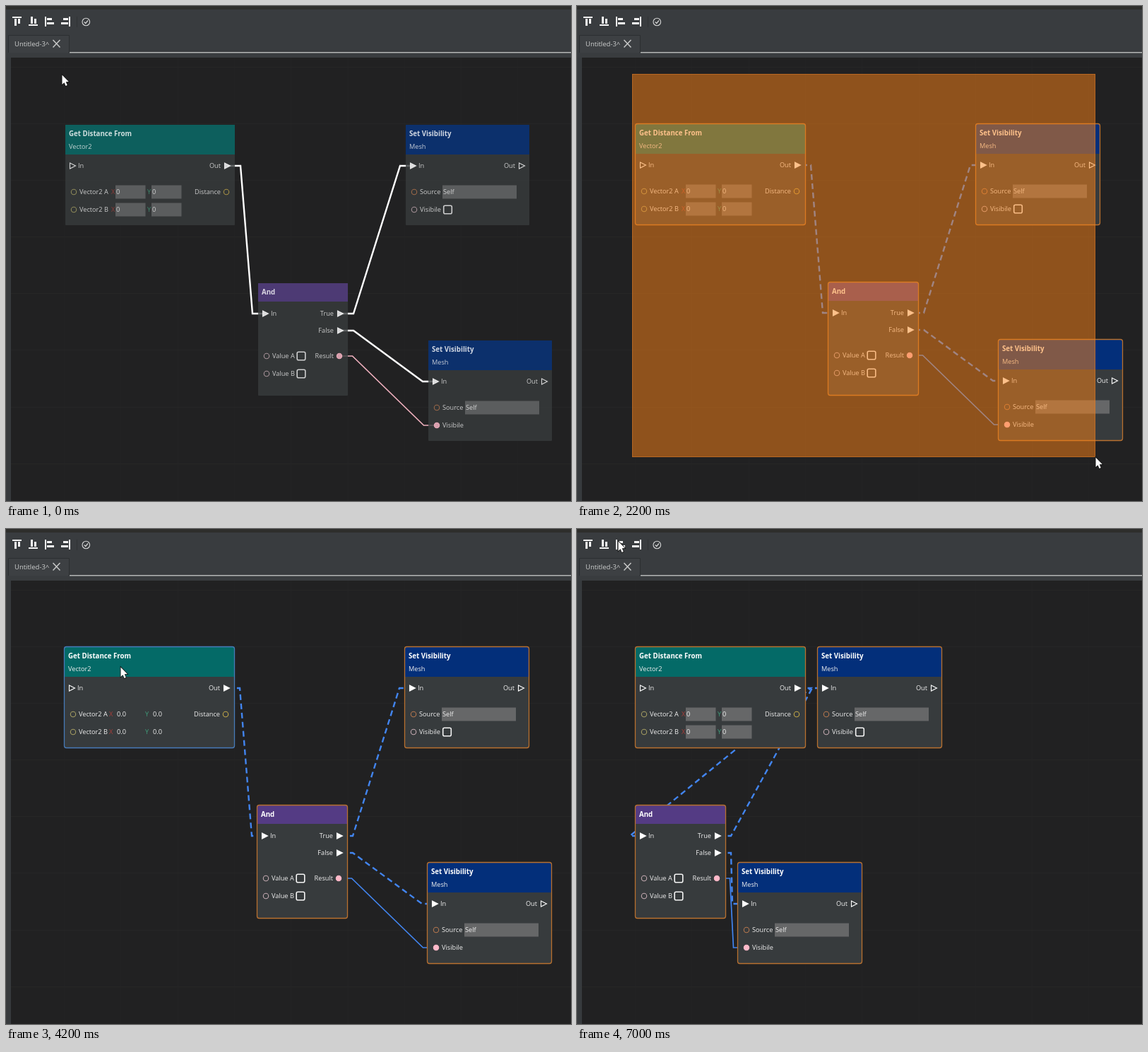
Animation of 800x700 px, one loop 7.2 s. Source, as an HTML page with a canvas:

```html
<!DOCTYPE html>
<html lang="en">
<head>
<meta charset="utf-8">
<title>Node alignment</title>
<style>
  html, body { margin: 0; width: 100%; height: 100%; overflow: hidden; background: #212122; }
  canvas { display: block; }
</style>
</head>
<body>
<canvas id="stage" width="800" height="700"></canvas>
<script>
const ctx = document.getElementById('stage').getContext('2d');
const LOOP = 7200, STEP = 200;
const DRAG_START = 600, DRAG_END = 3800, ALIGN_AT = 6200;
const ORIGIN = [78, 96];
const ORANGE = '#b8702f', BLUE = '#4285f0', PINK = '#ffb9c9';

// Pointer path: time, x, y
const PATH = [
  [0, 79, 97], [600, 79, 97], [1400, 490, 518], [2000, 734, 638], [2200, 734, 638],
  [3200, 758, 647], [3600, 758, 647], [4200, 162, 195], [4800, 60, 22], [5000, 58, 17], [7200, 58, 17]
];

// Pins: kind, side, row offset, label, colour, connected
const meshPins = visible => [
  ['flow', 'in', 58, 'In', '#fff', true],
  ['flow', 'out', 58, 'Out', '#fff', false],
  ['data', 'in', 95, 'Source', '#b5764e', false],
  ['data', 'in', 120, 'Visibile', visible ? PINK : '#c3a9b0', visible]
];
const mesh = (x, alignedX, y, visible) => ({
  x, alignedX, y, w: 175, h: 142, head: 42, color: '#032f7a', title: 'Set Visibility', sub: 'Mesh',
  pins: meshPins(visible),
  extras(n) {
    field(n.x + 52, n.y + 95, 105, 'Self');
    if (!visible) checkbox(n.x + 59.5, n.y + 120);
  }
});
const distance = {
  x: 83, alignedX: 83, y: 167, w: 240, h: 142, head: 42, color: '#046a67',
  title: 'Get Distance From', sub: 'Vector2',
  pins: [
    ['flow', 'in', 58, 'In', '#fff', false],
    ['flow', 'out', 58, 'Out', '#fff', true],
    ['data', 'in', 95, 'Vector2 A', '#a49d62', false],
    ['data', 'in', 120, 'Vector2 B', '#a49d62', false],
    ['data', 'out', 95, 'Distance', '#bfa548', false]
  ],
  extras(n, hover) {
    for (const row of [95, 120]) {
      vectorPart('X', '#a83e3a', n.x + 65, n.y + row, hover);
      vectorPart('Y', '#3f9a78', n.x + 116, n.y + row, hover);
    }
  }
};
const and = {
  x: 356, alignedX: 83, y: 391, w: 127, h: 159, head: 26, color: '#543b84', title: 'And',
  pins: [
    ['flow', 'in', 43, 'In', '#fff', true],
    ['flow', 'out', 43, 'True', '#fff', true],
    ['flow', 'out', 67, 'False', '#fff', true],
    ['data', 'in', 103, 'Value A', '#c3a9b0', false],
    ['data', 'in', 128, 'Value B', '#c3a9b0', false],
    ['data', 'out', 103, 'Result', PINK, true]
  ],
  extras(n) {
    checkbox(n.x + 61, n.y + 103);
    checkbox(n.x + 61, n.y + 128);
  }
};
const upper = mesh(565, 341, 167, false);
const lower = mesh(597, 228, 472, true);
const nodes = [distance, and, upper, lower];
// Wires: from, row, to, row, is data
const wires = [
  [distance, 58, and, 43], [and, 43, upper, 58], [and, 67, lower, 58], [and, 103, lower, 120, true]
];

function rect(x, y, w, h, color) {
  ctx.fillStyle = color;
  ctx.fillRect(x, y, w, h);
}
function line(points, color, width, close) {
  ctx.beginPath();
  points.forEach(([x, y]) => ctx.lineTo(x, y));
  if (close) ctx.closePath();
  ctx.strokeStyle = color;
  ctx.lineWidth = width;
  ctx.stroke();
}
function text(str, x, y, color = '#f0f0f0', align = 'left', font = '9.2px') {
  ctx.font = `${font} "Open Sans", "Noto Sans", sans-serif`;
  ctx.textAlign = align;
  ctx.fillStyle = color;
  ctx.fillText(str, x, y + 3.3);
}
function field(x, y, w, value) {
  rect(x, y - 9.5, w, 19, '#666768');
  text(value, x + 1, y);
}
function vectorPart(axis, color, x, y, hover) {
  if (hover) {
    text(axis, x - 2, y, color);
    text('0.0', x + 9, y);
  } else {
    text(axis, x, y, color);
    field(x + 6, y, 42.5, '0');
  }
}
function checkbox(x, y) {
  ctx.beginPath();
  ctx.roundRect(x - 5.8, y - 5.8, 11.6, 11.6, 2);
  ctx.strokeStyle = '#f4f4f4';
  ctx.lineWidth = 1.6;
  ctx.stroke();
}

function pointer(t) {
  const i = PATH.findIndex(p => p[0] > t);
  const [t0, x0, y0] = PATH[i - 1], [t1, x1, y1] = PATH[i];
  const k = (t - t0) / (t1 - t0);
  return [x0 + (x1 - x0) * k, y0 + (y1 - y0) * k];
}

function drawPin(n, [kind, side, row, label, color, connected]) {
  const out = side === 'out', y = n.y + row, flow = kind === 'flow';
  const edge = flow ? 10.5 : 12;
  const x = out ? n.x + n.w - edge : n.x + edge;
  ctx.beginPath();
  if (flow) {
    ctx.moveTo(x - 4, y - 4);
    ctx.lineTo(x + 4, y);
    ctx.lineTo(x - 4, y + 4);
    ctx.closePath();
  } else {
    ctx.arc(x, y, 3.7, 0, 7);
  }
  ctx.fillStyle = ctx.strokeStyle = color;
  ctx.lineWidth = 1.1;
  if (connected) ctx.fill();
  ctx.stroke();
  const gap = flow ? 18 : 20;
  text(label, out ? n.x + n.w - 20 : n.x + gap, y, undefined, out ? 'right' : 'left');
}

function drawNode(n, hover) {
  ctx.save();
  ctx.globalAlpha = n.selected ? 1 : 0.8;
  const grow = n.selected ? 0.5 : 0;
  ctx.beginPath();
  ctx.roundRect(n.x - grow, n.y - grow, n.w + 2 * grow, n.h + 2 * grow, n.selected ? 3 : 1);
  ctx.fillStyle = '#373b3d';
  ctx.fill();
  rect(n.x, n.y, n.w, n.head, n.color);
  if (n.selected) {
    ctx.strokeStyle = hover ? '#477ab8' : ORANGE;
    ctx.lineWidth = 1.3;
    ctx.stroke();
  }
  text(n.title, n.x + 5, n.y + 13, '#fff', 'left', 'bold 9.7px');
  if (n.sub) text(n.sub, n.x + 5, n.y + 30.5);
  n.pins.forEach(p => drawPin(n, p));
  n.extras(n, hover);
  ctx.restore();
}

function drawWire([from, rowA, to, rowB, data], t) {
  const inset = data ? 12 : 10.5;
  const a = from.x + from.w - inset, b = to.x + inset;
  const y0 = from.y + rowA, y1 = to.y + rowB;
  const active = from.selected && to.selected;
  if (active && !data) {
    ctx.setLineDash([8, 5]);
    ctx.lineDashOffset = 4.5 - t * 0.0045;
  }
  line([[a, y0], [a + 18.5, y0], [b - 18.5, y1], [b, y1]],
    active ? BLUE : data ? '#efb0be' : '#fff', data ? 1.7 : 2.4);
  ctx.setLineDash([]);
}

function drawGrid() {
  rect(7, 73, 793, 627, '#212122');
  for (let x = 82; x < 800; x += 80.3) rect(Math.round(x), 73, 1, 627, '#232324');
  for (let y = 85.5; y < 700; y += 80.2) rect(7, Math.round(y), 793, 1, '#262626');
}

function drawToolbar() {
  rect(0, 0, 800, 73, '#393c3f');
  rect(0, 0, 800, 5, '#2e2e2c');
  rect(0, 73, 7, 627, '#373a3d');
  // Align top, bottom, left, right
  const white = '#f4f4f4';
  rect(9, 15, 13, 2, white); rect(12, 18, 3, 10, white); rect(17, 18, 3, 7, white);
  rect(32, 26, 13, 2, white); rect(35, 15, 3, 10, white); rect(40, 18, 3, 7, white);
  rect(55, 15, 2, 14, white); rect(58, 17, 7, 3, white); rect(58, 23, 10, 3, white);
  rect(89, 15, 2, 14, white); rect(81, 17, 7, 3, white); rect(78, 23, 10, 3, white);
  rect(100, 15, 1, 15, '#303335');
  ctx.beginPath();
  ctx.arc(113.3, 22.5, 5.3, 0, 7);
  ctx.strokeStyle = '#d4d5d5';
  ctx.lineWidth = 1.1;
  ctx.stroke();
  line([[110.7, 22.5], [112.7, 24.5], [116, 20.5]], '#d4d5d5', 1.2);
  // Document tab
  rect(3, 41, 87, 25, '#3d4043');
  line([[3.5, 66], [3.5, 41.5], [89.5, 41.5], [89.5, 66]], '#2c2f31', 1);
  rect(90, 65, 710, 1.5, '#b4b6b6');
  text('Untitled-3^', 12, 53.5, '#cfd0d0', 'left', '9.5px');
  line([[66.5, 48], [76.5, 58.5]], '#c6c7c7', 1.5);
  line([[76.5, 48], [66.5, 58.5]], '#c6c7c7', 1.5);
}

function drawCursor([x, y]) {
  const shape = [[0, 0], [0, 13.5], [3, 10.7], [5, 15.5], [7.3, 14.5], [5.3, 9.8], [9.3, 9.6]];
  ctx.save();
  ctx.translate(x + 0.5, y + 0.5);
  line(shape, '#111', 1.6, true);
  ctx.fillStyle = '#fff';
  ctx.fill();
  ctx.restore();
}

function draw(t) {
  const cursor = pointer(t);
  const started = t >= DRAG_START, dragging = started && t < DRAG_END;
  // The marquee trails slightly behind the pointer
  const corner = pointer(Math.max(0, Math.min(t, DRAG_END - STEP) - 120));
  const bases = nodes.map(n => n.x);
  for (const n of nodes) {
    n.selected = started && corner[0] > n.x && corner[1] > n.y;
    if (t >= ALIGN_AT) n.x = n.alignedX;
  }

  drawGrid();
  ctx.save();
  if (!started) ctx.translate(1, 1);
  wires.forEach(w => drawWire(w, t));
  for (const n of nodes) {
    const dx = cursor[0] - n.x, dy = cursor[1] - n.y;
    drawNode(n, t >= DRAG_END && dx > 0 && dx < n.w && dy > 0 && dy < n.h);
  }
  ctx.restore();

  if (dragging) {
    const [x, y] = ORIGIN, w = corner[0] - x, h = corner[1] - y;
    rect(x, y, w, h, 'rgba(254,131,22,.5)');
    ctx.strokeStyle = 'rgba(225,125,40,.5)';
    ctx.lineWidth = 1;
    ctx.strokeRect(x + 0.5, y + 0.5, w - 1, h - 1);
  }
  drawToolbar();
  drawCursor(cursor);
  nodes.forEach((n, i) => { n.x = bases[i]; });
}

function tick() {
  const t = performance.now() % LOOP;
  draw(Math.floor(t / STEP) * STEP);
  requestAnimationFrame(tick);
}
tick();
</script>
</body>
</html>
```
